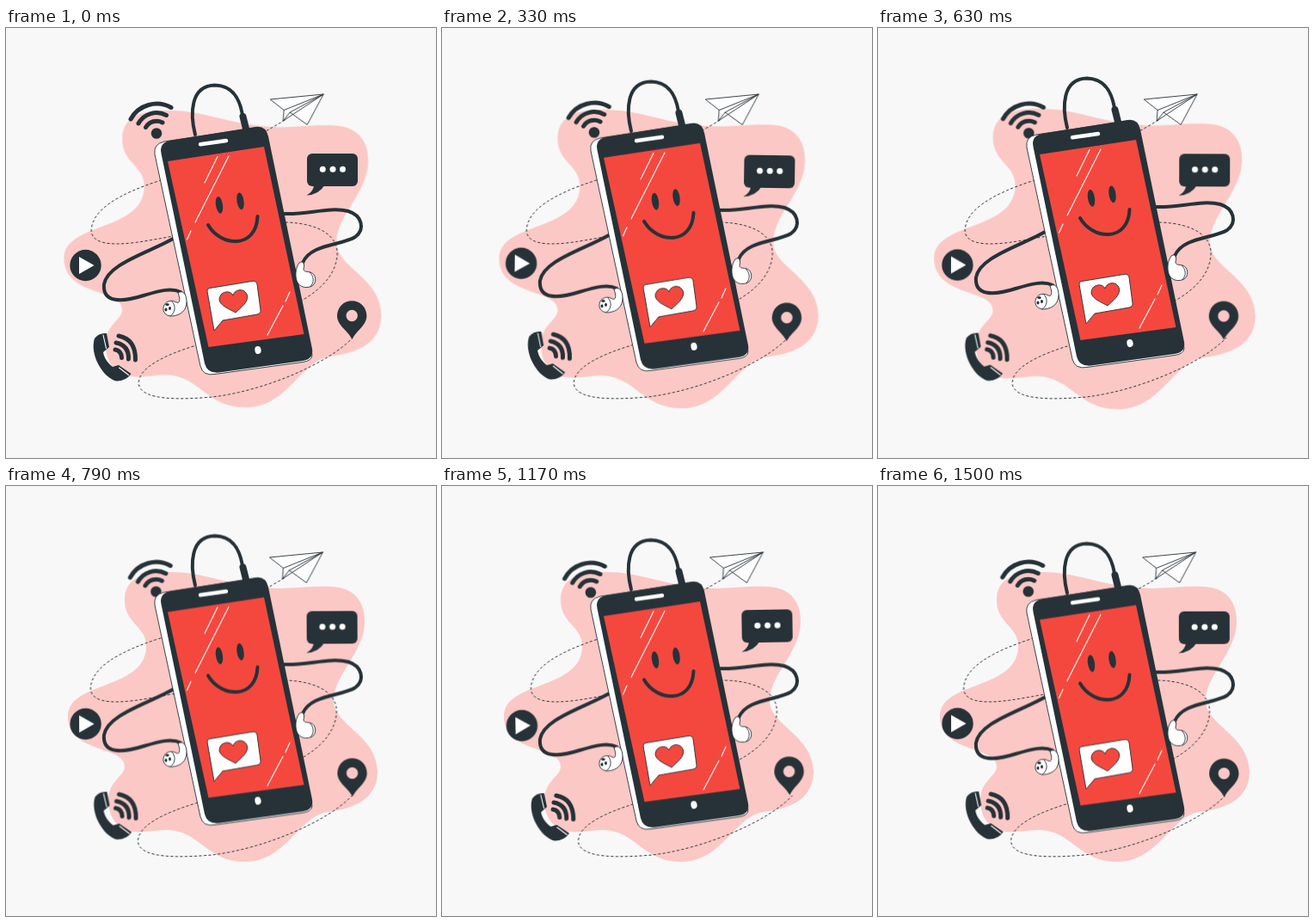
Write an HTML page that moves like this. It is 500x500 px and loops after 1.54 s.

```html
<!DOCTYPE html>
<html lang="en">
<head>
<meta charset="utf-8">
<title>Happy phone</title>
<style>
  html, body { margin: 0; width: 100%; height: 100%; overflow: hidden; background: #f8f8f8; }
  svg { display: block; width: 100%; height: 100%; }
  #blob { fill: #fbc8c5; transform-origin: 252px 268px; }
  #icons { transform-origin: 250px 250px; }
  .dark { fill: #263238; }
  .red { fill: #f4483f; }
  .white { fill: #fff; }
  .line { fill: none; stroke: #263238; stroke-linecap: round; stroke-linejoin: round; }
  .edge { stroke: #263238; stroke-width: .9; stroke-linejoin: round; }
  .glare { fill: none; stroke: #fff; stroke-width: 1.1; stroke-linecap: round; }
</style>
</head>
<body>
<svg viewBox="0 0 500 500">
  <path id="blob" d="M138 131C139 108 158 100 188 100C232 100 252 114 300 118C330 121 347 116 378 117C408 118 418 138 417 160C415 195 381 220 381 250C381 278 432 290 432 333C431 368 398 376 374 379C340 384 326 437 278 437C233 437 226 401 188 400C176 400 162 403 150 402C128 401 119 382 119 366C119 342 138 338 138 326C138 302 72 311 72 268C72 226 163 238 163 186C163 162 137 160 138 131Z"/>

  <g id="plane">
    <path class="line" stroke-width="1" stroke-dasharray="3 2.5" style="stroke-linecap:butt" d="M324 107C290 128 215 167 180 177C130 193 99 212 99 236C100 255 135 252 160 248C220 238 270 226 328 226C365 228 385 242 385 262C384 290 360 308 340 319C300 342 260 358 221 369C185 380 153 395 154 414C157 434 205 432 240 429C300 422 375 390 403 360"/>
    <path class="white edge" d="M307 83L369 77L350 112.500L330 98L322 108L323 95.500Z"/>
    <path class="line" stroke-width=".9" d="M323 95.500L369 77L330 98M322 108L369 77"/>
  </g>

  <g id="icons">
    <g class="line" stroke-width="5">
      <path d="M145 106A34.500 34.500 0 0 1 192 92.500"/>
      <path d="M154 111A24 24 0 0 1 186.500 101.500"/>
      <path d="M162.500 115.500A14.500 14.500 0 0 1 182 110"/>
      <path d="M131 358Q151 362 150.500 386M128 366Q143 369 142.500 385M127 374Q134 375 134.500 383.500"/>
    </g>
    <circle class="dark" cx="175" cy="122.500" r="6.300"/>
    <path class="dark" d="M103 361Q108 354 117 355L120 371L113 377C114 384 119 390 124 394L131 392L145.500 402Q139 411 128 410.500C112 406 97 379 103 361Z"/>
    <path class="glare" d="M113 357L116.500 372.500M131.500 395L142.500 403.500"/>
    <rect class="dark" x="350" y="146" width="59" height="38" rx="6"/>
    <path class="dark" d="M358 182Q358 190 349.500 194.500Q364 194 371 182Z"/>
    <g class="white">
      <circle cx="368.300" cy="164.300" r="3.500"/>
      <circle cx="380" cy="164.300" r="3.500"/>
      <circle cx="391.500" cy="164.300" r="3.500"/>
    </g>
    <circle class="dark" cx="92.500" cy="276" r="18.200"/>
    <path class="white" d="M85 266L102.500 276L85 286Z"/>
    <path class="dark" fill-rule="evenodd" d="M402.500 362C397 351 385 346 385 334.500A17.200 17.200 0 0 1 419.400 334.500C419.400 346 408 351 402.500 362ZM395.500 334.500a6.700 6.700 0 1 0 13.400 0a6.700 6.700 0 1 0 -13.400 0Z"/>
  </g>

  <g id="phone">
    <g class="line" stroke-width="4">
      <path d="M220 124C214 100 214 67 243 66.500C265 67 272 84 275 101"/>
      <path d="M318 215.500C345 219 375 207 398 213C414 218 418 234 406 243C390 253 354 251 345 273"/>
      <path d="M196 244C165 262 118 274 114 298C112 320 135 319 160 311C180 305 193 302 203 307"/>
      <path stroke-width="8" d="M275.500 103L279 117"/>
    </g>
    <path class="white edge" d="M173 147Q171 135 184 132L290 116L356 380Q356 387 345 388.500L243 402.500Q229 405 226 393Z"/>
    <path class="dark" d="M180.500 146Q178 134 190 131L290 115Q302 113 305 126L356 373Q358 385 345 387L248 400.500Q234 402 231 390Z"/>
    <path class="red" d="M188 155L300 138L346.500 356L235.500 371Z"/>
    <path class="glare" style="stroke-width:4.500" d="M226 135.300L256 131"/>
    <ellipse class="white" cx="293" cy="374.500" rx="3.600" ry="4.500" transform="rotate(-10 293 374.500)"/>
    <path class="glare" d="M246 149.500L231 180M259 149L220 226M215 236L210.500 246M330 307L325 318M322 323L304 357"/>
    <ellipse class="dark" cx="248" cy="205.800" rx="4" ry="10" transform="rotate(-9 248 205.800)"/>
    <ellipse class="dark" cx="272.500" cy="201.300" rx="4" ry="10" transform="rotate(-9 272.500 201.300)"/>
    <path class="line" stroke-width="4" d="M235 229C250 255 291 257 292.500 219"/>
    <path class="white edge" d="M237 302.500L287 294.300Q291 294 292 298L296 328Q296.500 332 292 333L252 340L242 352L234 306Q233.500 303 237 302.500Z"/>
    <path class="red edge" d="M264 311C261 304 248 306 248 316C249 323 260 327 267 331C273 325 282 319 280.500 311C278 302 266 303 264 311Z"/>
    <path class="white edge" d="M200 308C206 304 210 310 210 318C210 328 204 334 193 335C184 335 181 328 184 322C187 317 193 316 198 319C202 321 203 316 200 308Z"/>
    <path class="line" stroke-width=".9" d="M193 318C198 323 197 331 191 335"/>
    <g class="dark">
      <ellipse cx="187.500" cy="321.500" rx="2.200" ry="1.500"/>
      <ellipse cx="190.500" cy="326" rx="1.500" ry="2"/>
      <ellipse cx="186" cy="327.500" rx="1.500" ry="2"/>
    </g>
    <path class="white edge" d="M341 273C345 270 348 274 346 280C346 284 350 283 354 284C361 286 362 297 355 300.500C348 303 342 301 339 296C336 290 336 280 341 273Z"/>
    <path class="line" stroke-width=".9" d="M353 284C358 288 359 296 354 300.500"/>
  </g>
</svg>
<script>
  const LOOP = 1540, LEAD = 38;

  // steps: [offset, value, easing]
  function play(id, make, steps) {
    const frames = steps.map(([offset, v, easing = 'linear']) =>
      ({ offset, easing, transform: make(v) }));
    document.getElementById(id).animate(frames,
      { duration: LOOP, iterations: Infinity, delay: -LEAD });
  }

  play('blob', v => `scale(${v})`, [
    [0, 1], [.101, 1.1, 'ease-in'], [.195, 1], [.34, 1.1, 'ease-in'], [.466, 1], [1, 1]
  ]);
  play('phone', v => `translateY(${v}px)`, [[0, .5], [.5, -9.3], [1, .5]]);
  play('icons', v => `rotate(${v}deg)`, [[0, -.1], [.25, .9], [.75, -1.1], [1, -.1]]);
  play('plane', v => `translateX(${v}px)`, [
    [0, .6], [.1, -1], [.19, 2], [.3, -4], [.415, 4], [.5, -4],
    [.59, 4], [.69, -4], [.785, 4.4], [.9, -1], [1, .6]
  ]);
</script>
</body>
</html>
```
